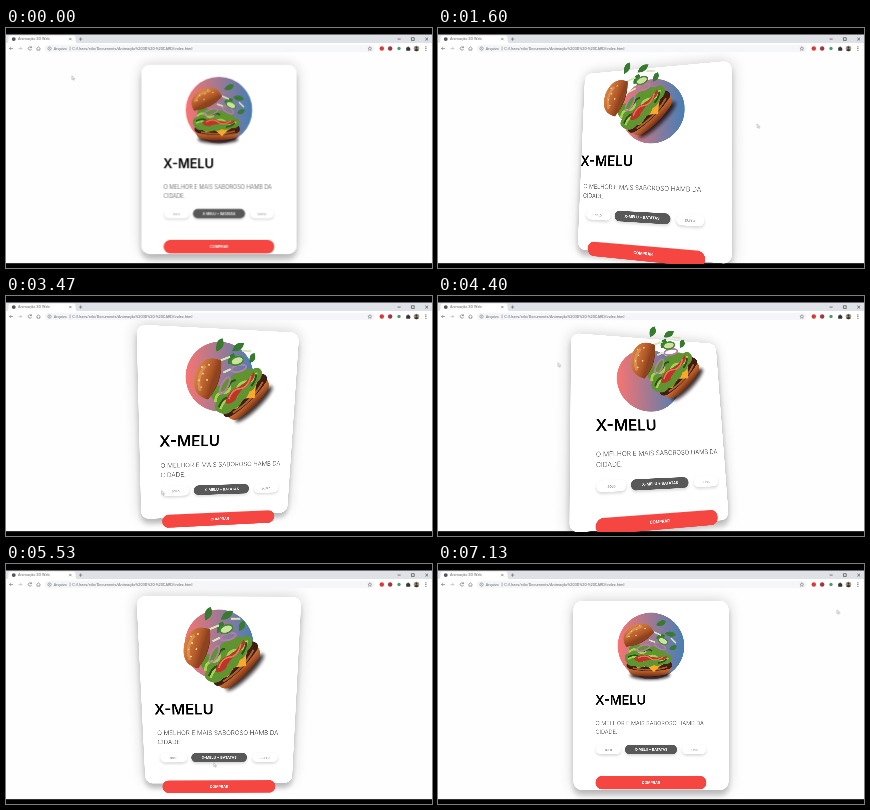
An HTML page that plays this animation: 426 by 240 pixels, repeating every 7190 ms.

```html
<!DOCTYPE html>
<html lang="pt">
<head>
<meta charset="utf-8">
<title>Animação 3D</title>
<style>
html, body { margin: 0; width: 100%; height: 100%; overflow: hidden; background: #000; }
/* The desktop is laid out at 1536 px and scaled down to the stage. */
#desk { position: absolute; left: 0; top: 0; width: 1536px; height: 866px; overflow: hidden;
  transform: scale(.27734); transform-origin: 0 0; font-family: Inter, sans-serif; background: #000; }
#desk div, #desk svg { position: absolute; }
#bar { left: 0; top: 0; }
#bar text { font-family: Roboto, sans-serif; font-size: 14px; fill: #666; }
#view { left: 0; top: 90px; width: 1536px; height: 758px; background: #fefefe; overflow: hidden;
  perspective: 1000px; perspective-origin: 768px 384px; }
#card { left: 488px; top: 43px; width: 560px; height: 682px; background: #fff; border-radius: 30px;
  box-shadow: 0 20px 20px rgba(0,0,0,.2), 0 0 50px rgba(0,0,0,.2); transform-style: preserve-3d; }
#disc { left: 160px; top: 43px; width: 240px; height: 240px; border-radius: 50%;
  background: linear-gradient(to right, rgba(245,70,66,.75), rgba(8,83,156,.75)); }
#burger { left: 154px; top: 37px; width: 252px; height: 252px; overflow: visible; }
#title { left: 79px; top: 322px; width: 400px; font: 600 46px/70px Inter, sans-serif; color: #000; }
#info { left: 80px; top: 426px; width: 440px; font: 300 20px/31px Inter, sans-serif; color: #555; white-space: nowrap; }
#sizes { left: 0; top: 519px; width: 560px; height: 34px; }
.pill { height: 34px; line-height: 38px; border-radius: 30px; text-align: center; font-weight: 500;
  font-size: 9px; color: #888; background: #fff; box-shadow: 0 5px 10px rgba(0,0,0,.16); white-space: nowrap; }
#sizes .on { background: #585858; color: #fff; font-size: 12.2px; font-weight: 700; line-height: 34px; }
#buy { left: 80px; top: 631px; width: 400px; height: 49px; line-height: 49px; background: #f54642;
  color: #fff; font-size: 12.8px; font-weight: 700; box-shadow: none; }
#mouse { left: 0; top: 0; width: 12px; height: 17px; overflow: visible; }
</style>
</head>
<body>
<div id="desk">
  <svg id="bar" width="1536" height="90">
    <path d="M0 23H1536V54H0z" fill="#dee1e6"/>
    <path d="M0 54H1536V90H0z" fill="#fff"/>
    <path d="M2 54Q9 54 9 46V36Q9 27 18 27H242Q251 27 251 36V46Q251 54 258 54z" fill="#fff"/>
    <circle cx="28" cy="40" r="7" fill="#555"/>
    <text x="43" y="45">Animação 3D Web</text>
    <g fill="none" stroke="#555" stroke-width="2">
      <path d="M228 36l8 8m0-8l-8 8M263 40h12m-6-6v12"/>
      <path d="M1412 40h11M1462 35h10v10h-10zM1512 35l10 10m0-10l-10 10" stroke="#222"/>
      <path d="M25 74H13m5-5l-5 5 5 5"/>
      <path d="M45 74H57m-5-5l5 5-5 5" stroke="#aaa"/>
      <path d="M91 70A6 6 0 1 0 92 76M92 66V71H87"/>
      <path d="M110 74l7-6 7 6m-12 0v6h10v-6"/>
    </g>
    <rect x="140" y="60" width="1190" height="27" rx="13.5" fill="#f5f6f9"/>
    <g fill="none" stroke="#555" stroke-width="1.6">
      <circle cx="157" cy="74" r="6"/><path d="M157 73v4m0-7v1M231 67v14"/>
      <path d="M1312 67l2 5 5 .4-4 3.4 1.5 5-4.5-3-4.5 3 1.5-5-4-3.4 5-.4z"/>
    </g>
    <text x="172" y="79">Arquivo</text>
    <text x="239" y="79">C:/Users/nilo/Documents/Animação%203D%20-%20CARD/index.html</text>
    <circle cx="1355" cy="74" r="8" fill="#d93a33"/>
    <circle cx="1385" cy="74" r="8" fill="#a73540"/>
    <circle cx="1417" cy="74" r="6" fill="#4a9a70"/>
    <path d="M1443 70h4a3 3 0 0 1 6 0h4v4a3 3 0 0 1 0 5v3h-14z" fill="#333"/>
    <circle cx="1480" cy="74" r="10" fill="#a89b86"/>
    <path d="M1472 80q8-9 16 0q-8 7-16 0z" fill="#333"/><circle cx="1480" cy="71" r="4" fill="#333"/>
    <g fill="#444"><circle cx="1514" cy="68" r="2"/><circle cx="1514" cy="74" r="2"/><circle cx="1514" cy="80" r="2"/></g>
  </svg>
  <div id="view">
    <div id="card">
      <div id="disc"></div>
      <svg id="burger" viewBox="-35 -35 70 70">
        <defs>
          <filter id="soft" x="-50%" y="-100%" width="200%" height="300%"><feGaussianBlur stdDeviation="1.5"/></filter>
          <linearGradient id="bun" x2="0" y2="1"><stop stop-color="#d98442"/><stop offset=".55" stop-color="#b25a28"/><stop offset="1" stop-color="#6f2c14"/></linearGradient>
        </defs>
        <ellipse cx="-1" cy="29" rx="20" ry="4.5" fill="#120c10" opacity=".85" filter="url(#soft)"/>
        <path d="M-23 21Q-3 26 20 20Q20 28 12 29Q-3 32-17 29Q-23 28-23 21z" fill="url(#bun)"/>
        <path d="M-24 17Q-3 12 20 16Q23 21 18 23Q-3 27-21 23Q-26 21-24 17z" fill="#431d14"/>
        <path d="M-18 22q18 4 34-1" fill="none" stroke="#a5632f" stroke-width="1.5"/>
        <path d="M-20 17L16 16 9 20 3 26-4 20-13 22z" fill="#f6a92b"/>
        <!-- lettuce, tomato, onion -->
        <path d="M-26 13q-1-5 4-6-1-7 4-9 5-2 8 2 5-3 9 1 5-2 9 2 6 0 8 5 6 1 5 6-3 5-9 4-5 3-9 1-5 3-9 1-5 3-10 0-8 1-10-7z" fill="#5f9430"/>
        <path d="M-22 6q5-5 9-1t8 0m-18 8q6-4 10 0t9-1 11 0 10 0" fill="none" stroke="#a9cf54" stroke-width="2"/>
        <path d="M-23 11q6-3 10-1m6-5q5-3 8 0m6 12q6-1 9-4" fill="none" stroke="#29521e" stroke-width="1.6"/>
        <path d="M-17 12Q-9 7-2 10T16 10Q15 15 6 14T-9 16Q-16 16-17 12z" fill="#bd3428"/>
        <path d="M-13 12q7-4 12 0t13-1" fill="none" stroke="#e9775c" stroke-width="1.2"/>
        <g fill="none" stroke="#b77baa" stroke-width="1.4">
          <ellipse cx="-8" cy="2" rx="7" ry="2.5" transform="rotate(-18 -8 2)"/>
          <ellipse cx="9" cy="0" rx="6" ry="2.5" transform="rotate(30 9 0)"/>
        </g>
        <g fill="#377a30">
          <path d="M5-21q5-7 10-4-2 7-10 4z"/><path d="M14-13q7-4 11 2-6 4-11-2z"/>
          <path d="M5-8q4-6 9-3-2 8-9 3z"/><path d="M18 3q4-6 8-3-2 6-8 3z"/>
        </g>
        <ellipse cx="12" cy="-5" rx="5" ry="3" transform="rotate(25 12 -5)" fill="#cfe0a0" stroke="#3f8a35" stroke-width="1.2"/>
        <path d="M3-14l7 3M20-8l5 5M-2-6l6 2" stroke="#d9e6bd" stroke-width="1.5"/>
        <g transform="translate(-13 -10.500) rotate(-27) scale(1.12)">
          <path d="M-14 4Q-15-9 0-10Q15-9 14 4Q0 10-14 4z" fill="url(#bun)"/>
          <path d="M-14 4Q0 1 14 4Q0 9-14 4z" fill="#8c4420"/>
          <path d="M-10-3q8-6 17-2" fill="none" stroke="#e8a263" stroke-width="2" opacity=".6"/>
          <path d="M-8-3h1m3-3h1m4 1h1m3-2h1m2 4h1M-2-1h1" stroke="#ffe2a6"/>
        </g>
      </svg>
      <div id="title">X-MELU</div>
      <div id="info">O MELHOR E MAIS SABOROSO HAMB DA<br>CIDADE.</div>
      <div id="sizes">
        <div class="pill" style="left:82px;width:90px">SOLO</div>
        <div class="pill on" style="left:186px;width:188px">X-MELU + BATATAS</div>
        <div class="pill" style="left:392px;width:86px">DUPLO</div>
      </div>
      <div id="buy" class="pill">COMPRAR</div>
    </div>
  </div>
  <svg id="mouse" viewBox="0 0 14 20"><path d="M0 0V16L4 12.5 7 19 10 18 7 11.5H12z" fill="#fff" stroke="#777" stroke-width="1.5"/></svg>
</div>
<script>
const LOOP = 7190, SCALE = 1536 / 426, CENTER = [213, 131];
// Pointer path: time, x, y in stage pixels
const path = [
  [0, 67, 50], [800, 64, 41], [1000, 106, 48], [1300, 215, 75], [1600, 320, 98],
  [2330, 366, 105], [2650, 320, 140], [3000, 235, 185], [3470, 157, 197], [4000, 122, 130],
  [4400, 121, 69], [4750, 200, 52], [5130, 285, 110], [5530, 209, 201], [5850, 140, 150],
  [6120, 200, 70], [6400, 320, 52], [7130, 400, 48], [7190, 400, 48]
];
// Spans in which the pointer is over the card area
const hovers = [[1000, 1600], [2650, 6400]];
const lift = { title: 150, info: 125, sizes: 100, buy: 75 };
const $ = id => document.getElementById(id);
const clamp = u => Math.max(0, Math.min(1, u));
const easeOut = u => 1 - (1 - clamp(u)) ** 2;

function bezierEase(u) { // the CSS "ease" curve
  u = clamp(u);
  let lo = 0, hi = 1, s = .5;
  for (let i = 0; i < 16; i++) {
    s = (lo + hi) / 2;
    if (.75 * s * (1 - s) + s ** 3 < u) lo = s; else hi = s;
  }
  return .3 * s * (1 - s) ** 2 + 3 * s * s * (1 - s) + s ** 3;
}

function slope(i, axis) {
  const a = path[Math.max(0, i - 1)], b = path[Math.min(path.length - 1, i + 1)];
  return (b[axis] - a[axis]) / (b[0] - a[0]);
}

function pointer(t) {
  let i = 0;
  while (i < path.length - 2 && path[i + 1][0] <= t) i++;
  const a = path[i], b = path[i + 1], d = b[0] - a[0], u = (t - a[0]) / d, v = 1 - u;
  return [1, 2].map(k => a[k] * (1 + 2 * u) * v * v + b[k] * (3 - 2 * u) * u * u
    + d * u * v * (slope(i, k) * v - slope(i + 1, k) * u));
}

function draw(now) {
  const t = now % LOOP, pos = pointer(t);
  let tilt = [0, 0], rise = 0;
  for (const [enter, leave] of hovers) {
    if (t < enter) continue;
    const back = 1 - bezierEase((t - leave) / 500);
    tilt = pointer(Math.min(t, leave)).map((p, k) => (CENTER[k] - p) * SCALE / 25 * back);
    rise = easeOut((t - enter) / 750) * (1 - easeOut((t - leave) / 750));
  }
  $('card').style.transform = `rotateY(${tilt[0]}deg) rotateX(${tilt[1]}deg)`;
  $('burger').style.transform = `translateZ(${200 * rise}px) rotateZ(${-45 * rise}deg)`;
  for (const id in lift) $(id).style.transform = `translateZ(${lift[id] * rise}px)`;
  $('mouse').style.transform = `translate(${pos[0] * SCALE - 4}px, ${pos[1] * SCALE - 8}px)`;
}

const start = performance.now();
function tick() {
  draw(performance.now() - start);
  requestAnimationFrame(tick);
}
tick();
</script>
</body>
</html>
```
